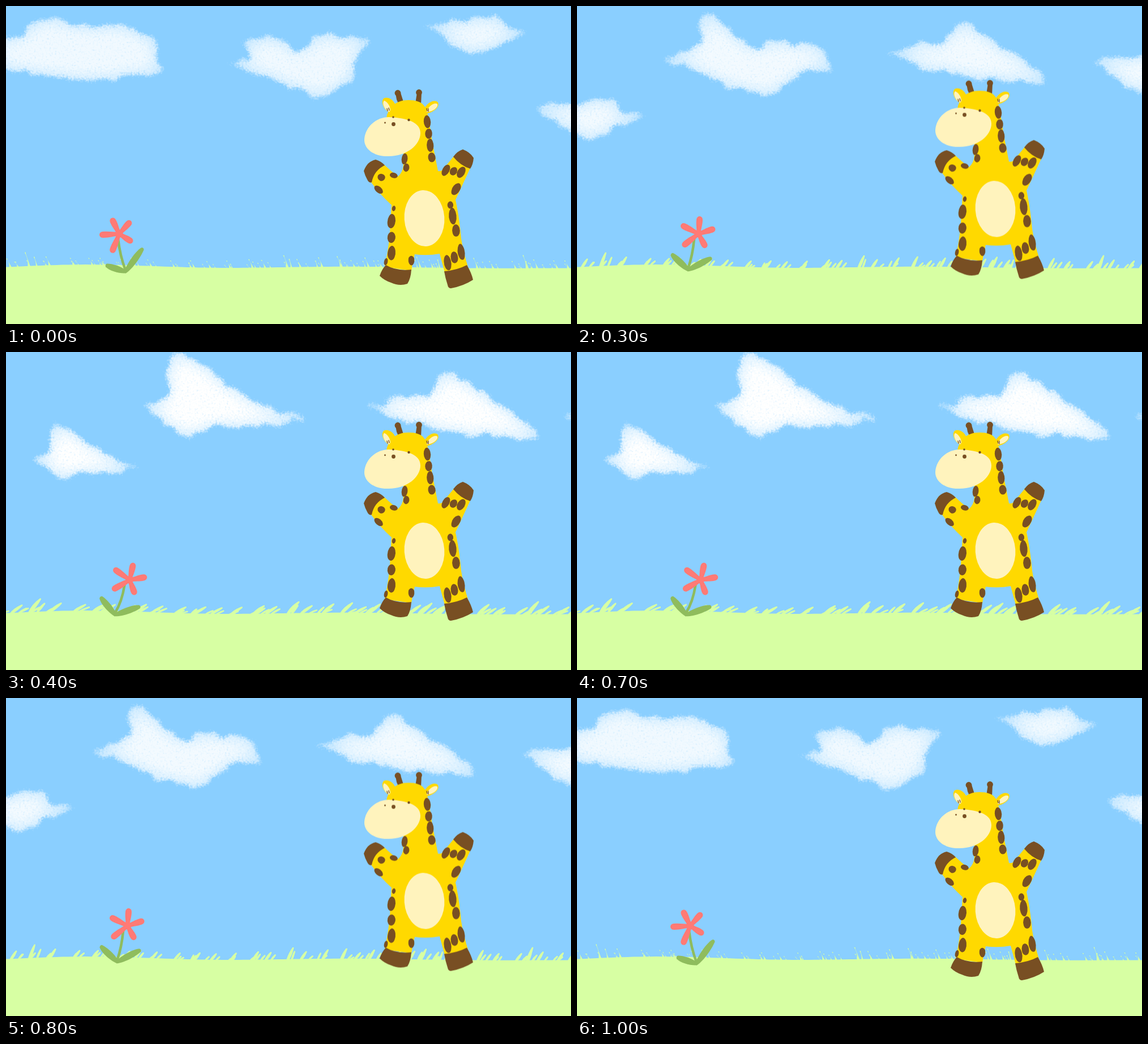
Animation of 998x561 px, one loop 1200 ms. Source, as an HTML page:

```html
<!DOCTYPE html>
<html lang="en">
<head>
<meta charset="utf-8">
<title>Giraffe in the meadow</title>
<style>
html, body { margin: 0; width: 100%; height: 100%; overflow: hidden; background: #8acfff; }
svg { position: absolute; left: 0; top: 0; width: 998px; height: 561px; overflow: hidden; }
.layer { will-change: opacity, transform; }
</style>
</head>
<body>
<svg id="ground" viewBox="0 0 998 561">
  <defs>
    <filter id="chalk" filterUnits="userSpaceOnUse" x="-40" y="-20" width="1080" height="290" color-interpolation-filters="sRGB">
      <feTurbulence type="fractalNoise" baseFrequency=".05" numOctaves="3" seed="4" result="wave"/>
      <feDisplacementMap in="SourceGraphic" in2="wave" scale="24" xChannelSelector="R" yChannelSelector="G" result="shape"/>
      <feGaussianBlur in="shape" stdDeviation="5" result="soft"/>
      <feGaussianBlur in="shape" stdDeviation="17" result="depth"/>
      <feTurbulence type="fractalNoise" baseFrequency=".3" numOctaves="2" seed="9"/>
      <feColorMatrix values="0 0 0 0 1  0 0 0 0 1  0 0 0 0 1  0 0 0 1.8 -.4" result="grain"/>
      <feComposite in="soft" in2="grain" operator="arithmetic" k2="1.7" k3=".8" k4="-.85" result="edge"/>
      <feComposite in="edge" in2="depth" operator="arithmetic" k1=".65" k2=".38" result="puff"/>
      <feComposite in="puff" in2="grain" operator="arithmetic" k1=".2" k2=".89"/>
    </filter>
  </defs>
</svg>
<svg id="giraffe" class="layer" viewBox="0 0 998 561"></svg>
<script>
const NS = 'http://www.w3.org/2000/svg';
const LOOP = 1200;
const GRASS = '#d7ffa3', YELLOW = '#ffd900', CREAM = '#fff3bd', BROWN = '#784f23', PINK = '#ff7a75', LEAF = '#8fbc5d';

// sway bends flower and grass, slide moves the sky
const POSES = [
  { sway: 0, lift: 0, sky: 'calm', slide: 0, alpha: .88 },
  { sway: .32, lift: -8, sky: 'breeze', slide: -80, alpha: .88 },
  { sway: .64, lift: -16.5, sky: 'breeze', slide: 0, alpha: .9 },
  { sway: .81, lift: -24, sky: 'gust', slide: -70, alpha: 1 },
  { sway: 1, lift: -38.5, sky: 'gust', slide: 0, alpha: 1 }
];
// pose shown in each 100 ms slot
const ORDER = [0, 0, 1, 2, 3, 4, 4, 3, 2, 1, 0, 0];

const SHAPES = {
  wide: '0,42 45,32 60,12 90,0 170,16 225,10 285,40 293,101 208,108 115,108 0,88',
  heart: '0,55 36,45 26,19 71,0 121,35 151,7 251,6 224,53 218,83 154,121 96,89 36,71',
  swan: '0,82 82,55 70,29 75,6 97,0 132,39 182,67 192,47 292,60 315,106 257,105 202,147 127,135 72,107',
  star: '0,18 66,10 131,0 148,23 190,31 106,67 86,75 46,48',
  peak: '0,90 47,84 48,19 67,0 117,24 157,59 242,104 295,117 222,131 137,129 87,151 37,120',
  ridge: '0,66 58,45 110,46 143,0 193,27 243,64 303,101 310,126 238,117 178,117 68,91'
};
// shape, left, top, scale
const SKIES = {
  calm: [['wide', -20, 20, 1], ['heart', 394, 47, 1], ['star', 734, 15, 1], ['star', 928, 160, 1]],
  breeze: [['swan', 143, 11, 1], ['ridge', 545, 24, .92], ['star', 903, 79, 1], ['star', -70, 163, 1]],
  gust: [['peak', 306, 1, 1], ['ridge', 704, 31, 1], ['peak', 113, 125, .67], ['wide', -251, 129, 1], ['star', 1053, 90, 1]]
};

function add(parent, tag, attrs) {
  const el = document.createElementNS(NS, tag);
  for (const k in attrs) el.setAttribute(k, attrs[k]);
  return parent.appendChild(el);
}
const path = (g, d, fill) => add(g, 'path', { d, fill });
const mix = (a, b) => a.map((v, i) => (v + b[i]) / 2);

function random(seed) {
  return () => (seed = (seed * 16807) % 2147483647) / 2147483647;
}

const hillY = x => 458.5 + x * .004 - 4 * Math.cos((x - 160) / 75) * Math.exp(-x / 500);

function drawGround(g) {
  let d = 'M0 561';
  for (let x = 0; x <= 1000; x += 10) d += `L${x} ${hillY(x).toFixed(1)}`;
  path(g, d + 'L1000 561Z', GRASS);
}

function blade(root, h, lean, w) {
  const y = hillY(root) + 2, tip = root + lean;
  return `M${root - w} ${y}Q${root + lean * .2} ${y - h * .6} ${tip - 1} ${y - h}q3 -1 2 2` +
    `Q${root + lean * .55 + w} ${y - h * .4} ${root + w} ${y}Z`;
}

// tufts of one tall blade with smaller ones beside it
function grass(g, sway) {
  const rnd = random(73), lean = 41 * sway * sway - 7;
  let d = '';
  for (let x = -25; x < 1000; x += 18 + rnd() * 26) {
    const h = 13 + 15 * rnd() * rnd();
    d += blade(x, h, lean, 2.5);
    for (let n = 0; n < 2; n++)
      d += blade(x + (rnd() - .4) * 26, h * (.4 + rnd() * .35), lean * (.5 + rnd() * .4), 1.7);
  }
  path(g, d, GRASS);
}

function petal(g, x, y, deg, len) {
  add(g, 'path', {
    d: `M0 -3.5C${len * .3} -3.5 ${len * .5} -6 ${len - 6} -5.5C${len + 2} -5 ${len + 2} 5 ${len - 6} 5.5C${len * .5} 6 ${len * .3} 3.5 0 3.5Z`,
    fill: PINK, transform: `translate(${x} ${y}) rotate(${deg})`
  });
}

function leaf(g, x, y, tx, ty) {
  const dx = tx - x, dy = ty - y, len = Math.hypot(dx, dy);
  const at = (t, s) => `${x + dx * t - dy / len * s} ${y + dy * t + dx / len * s}`;
  path(g, `M${at(-.04, -2)}C${at(.25, -6.5)} ${at(.75, -7.5)} ${at(.97, -3)}` +
    `Q${at(1.04, 0)} ${at(.97, 3)}C${at(.75, 6)} ${at(.25, 7.5)} ${at(-.04, 2)}Z`, LEAF);
}

function flower(g, s) {
  const x = 200 + 23 * s, y = 402 + 2 * s * s - 1.5 * s;
  const rx = 211 - 23 * s, ry = 469 - 8 * s * s, top = 198 + 14 * s;
  add(g, 'path', {
    d: `M${top} 411Q${top + (rx - top) * .25} 440 ${rx} ${ry - 3}`,
    fill: 'none', stroke: LEAF, 'stroke-width': 4.6, 'stroke-linecap': 'round'
  });
  leaf(g, rx, ry, 176 - 26 * s + 18 * s * s, 457 - 31 * s);
  leaf(g, rx, ry, 242 - 6 * s, 427 + 27 * s);
  for (const [deg, len] of [[-116, 31], [-48, 31], [-183, 35], [32, 28], [112, 36]])
    petal(g, x, y, deg + 47 * s, len);
  add(g, 'circle', { cx: x, cy: y, r: 6.5, fill: PINK });
}

function clouds(g, { sky, slide, alpha }) {
  const set = add(g, 'g', { filter: 'url(#chalk)', opacity: alpha, fill: '#fff' });
  for (const [name, x, y, k] of SKIES[sky])
    add(set, 'polygon', { points: SHAPES[name], transform: `translate(${x + slide} ${y}) scale(${k})` });
}

function blob(x, y, rx, ry, deg, rnd) {
  const pts = [], n = 7, turn = rnd() * 6, a = deg * Math.PI / 180;
  for (let i = 0; i < n; i++) {
    const t = turn + i / n * Math.PI * 2, k = 1.1 + rnd() * .16;
    const u = Math.cos(t) * rx * k, v = Math.sin(t) * ry * k;
    pts.push([x + u * Math.cos(a) - v * Math.sin(a), y + u * Math.sin(a) + v * Math.cos(a)]);
  }
  let d = 'M' + mix(pts[n - 1], pts[0]);
  pts.forEach((p, i) => d += `Q${p} ${mix(p, pts[(i + 1) % n])}`);
  return d + 'Z';
}

// rows of spots, large and small in turn: start, end, count, size, tilt
const SPOT_ROWS = [
  [744, 204, 752, 267, 4, 6, 11, -5],
  [704, 270, 707, 285, 2, 5, 9, 5],
  [663, 302, 685, 299, 2, 6.5, 6, 15],
  [658, 324, 658, 324, 1, 5, 8.5, -48],
  [777, 290, 804, 293, 3, 6, 10, 30],
  [795, 323, 795, 323, 1, 6.5, 11, 28],
  [681, 380, 681, 436, 3, 6.5, 12, 6],
  [671, 451, 685, 357, 2, 3, 6, 10],
  [789, 371, 795, 396, 2, 6.5, 14, -4],
  [804, 434, 780, 453, 3, 6, 13, -8],
  [716, 449, 785, 351, 2, 5, 8, 0]
];

function spots(g) {
  const rnd = random(2024);
  let d = '';
  for (const [x0, y0, x1, y1, n, rx, ry, tilt] of SPOT_ROWS)
    for (let i = 0; i < n; i++) {
      const t = n > 1 ? i / (n - 1) : 0;
      d += blob(x0 + (x1 - x0) * t, y0 + (y1 - y0) * t, rx, i % 2 ? ry * .75 : ry, tilt, rnd);
    }
  path(g, d, BROWN);
}

function drawGiraffe(g) {
  const dot = (cx, cy, r) => add(g, 'circle', { cx, cy, r, fill: BROWN });

  // antlers and ears
  path(g, 'M688 154L690 165L693 172L702 169L697 153Z M726 153L723 172L733 174L734 153Z', BROWN);
  dot(692, 153.5, 5.4);
  dot(729.5, 152.5, 5.4);
  path(g, 'M679 189C668 184 661 170 667 163C675 159 685 166 688 175Z', YELLOW);
  path(g, 'M738 183C742 172 756 163 763 170C767 179 753 189 741 190Z', YELLOW);

  path(g, `M672 198C673 188 678 182 683 176C690 169 700 166 711 166C724 166 735 169 740 178
    C747 192 749 215 753 240L763 291Q769 292 772 288L792 264L820 286L794 342
    C798 360 802 385 804 410Q808 435 816 460L775 470Q770 452 766 437Q744 441 722 438
    Q718 452 716 467L669 460C672 445 676 425 678 400L681 351Q661 333 645 311Q644 288 668 280
    Q680 291 692 301Q701 294 702 280L702 255Z`, YELLOW);

  path(g, 'M677 187C669 184 663 171 668 167C674 169 679 177 679 184Z', CREAM);
  path(g, 'M743 187C744 178 757 169 762 173C764 180 752 187 743 187Z', CREAM);
  add(g, 'path', {
    d: 'M673 181l1 4M676 180l1 4M743 181l1 4M746 181l0 5',
    stroke: BROWN, 'stroke-width': 1.4, 'stroke-linecap': 'round'
  });

  spots(g);
  path(g, 'M633 235C635 212 655 196 676 196C700 197 732 202 732 224C732 245 708 265 676 265C650 266 632 252 633 235Z', CREAM);
  dot(684, 196, 1.8);
  dot(711.5, 201, 2.2);
  dot(669.5, 206, 1.4);
  dot(684.5, 208.5, 3.4);
  add(g, 'ellipse', { cx: 739, cy: 374.5, rx: 35.4, ry: 49.6, fill: CREAM, transform: 'rotate(-4 739 374.5)' });

  // hooves
  path(g, `M632 291Q638 274 653 271Q663 274 669 281Q650 290 646 311Q641 313 638 306Q634 299 632 291Z
    M807 253Q820 258 826 268Q825 280 820 287Q803 282 790 266Q797 256 807 253Z
    M671 457Q690 468 716 465Q715 481 709 490Q695 495 680 488Q668 484 660 476Q664 464 671 457Z
    M774 468Q797 466 814 457Q822 470 825 483Q808 494 786 498Q781 498 780 492Q776 480 774 468Z`, BROWN);
}

// hard steps through the slots, one keyframe per slot
function play(el, frame) {
  const frames = ORDER.map((pose, i) => ({ ...frame(POSES[pose]), offset: i / ORDER.length, easing: 'steps(1, end)' }));
  frames.push({ ...frame(POSES[ORDER[0]]), offset: 1 });
  el.animate(frames, { duration: LOOP, iterations: Infinity });
}

const giraffe = document.getElementById('giraffe');
drawGround(document.getElementById('ground'));
drawGiraffe(giraffe);

for (const pose of POSES) {
  const svg = add(document.body, 'svg', { class: 'layer', viewBox: '0 0 998 561' });
  document.body.insertBefore(svg, giraffe);
  clouds(svg, pose);
  grass(svg, pose.sway);
  flower(svg, pose.sway);
  play(svg, p => ({ opacity: p === pose ? 1 : 0 }));
}
play(giraffe, p => ({ transform: `translateY(${p.lift}px)` }));
</script>
</body>
</html>
```
